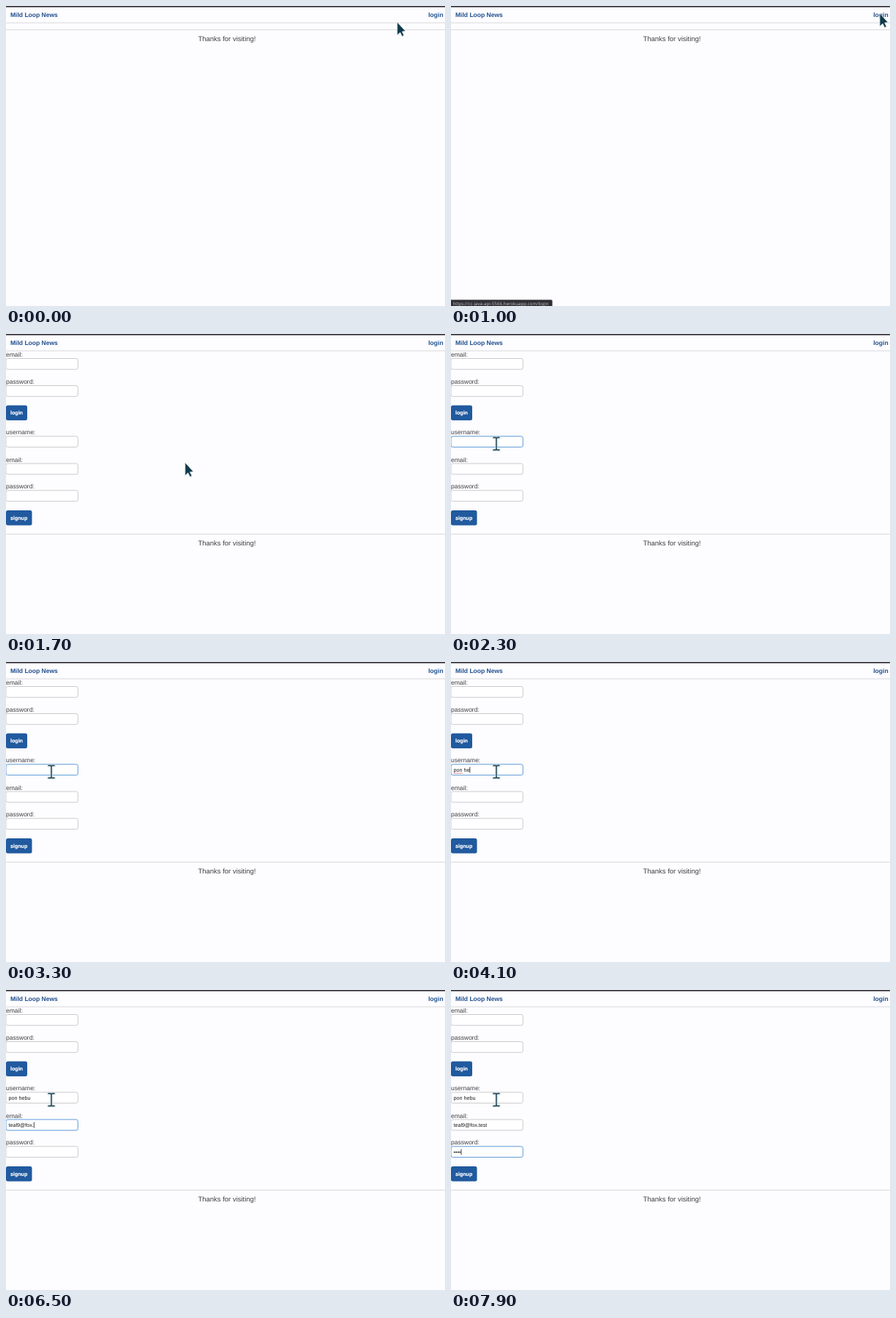
Recreate the animation shown at these times as an HTML page. Size 600 px wide and 410 px high, loop 8000 ms.

```html
<!DOCTYPE html>
<html lang="en">
<head>
<meta charset="utf-8">
<title>Sign-up form</title>
<style>
  html, body { margin: 0; width: 100%; height: 100%; overflow: hidden; background: #fdfcfe; }
  svg { display: block; width: 600px; height: 410px; }
  text { font: 8.53px "Liberation Sans", Arial, sans-serif; fill: #3f3f42; white-space: pre; text-rendering: geometricPrecision; }
  .nav { font-weight: bold; fill: #1f4f8f; }
  .foot { font-size: 9.48px; text-anchor: middle; }
  .value { font-size: 7.15px; fill: #18181a; }
  .button { font-size: 7.1px; font-weight: bold; fill: #fff; stroke: #fff; stroke-width: .2; }
  .status { font: 6.2px "Open Sans", sans-serif; fill: #c4c4c8; }
  .box { fill: #fff; stroke: #cbcbd0; stroke-width: 1; }
  .focus { stroke: #5c9bd8; }
  .rule { stroke: #d9d9dc; stroke-width: 1; }
</style>
</head>
<body>
<svg id="stage" viewBox="0 0 600 410">
  <rect width="600" height="410" fill="#fdfcfe"/>
  <rect width="600" height="1.6" fill="#2d2b31"/>
  <text class="nav" x="6" y="15.2">Mild Loop News</text>
  <text class="nav" x="597.6" y="15.2" text-anchor="end">login</text>
  <path class="rule" d="M0 23H600"/>
  <g id="form"></g>
  <g id="footer">
    <path class="rule" d="M0 32.5H600"/>
    <text class="foot" x="302" y="47.5">Thanks for visiting!</text>
  </g>
  <path id="squiggle" fill="none" stroke="#e0474c" stroke-width=".8"/>
  <rect id="caret" width=".8" height="8" fill="#111"/>
  <g id="status">
    <path d="M0 401.5H137Q138.5 401.5 138.5 403V410H0Z" fill="#302f34"/>
    <text class="status" x="2.5" y="409">https://cc-java-api-5566.herokuapp.com/login</text>
  </g>
  <path id="arrow" d="M0 0V17.8L4 14.2L6.7 19.6L9.3 18.3L6.7 13L11.3 12.4Z"
        fill="#103a4b" stroke="#e4e9ec" stroke-width=".8"/>
  <g id="beam" fill="none">
    <path d="M-5.5-8.5H5.5M0-8.5V8.5M-5.5 8.5H5.5" stroke="#d5dfe5" stroke-width="3.4"/>
    <path d="M-4.5-8.5H-1L0-7.5L1-8.5H4.5M0-7.5V7.5M-4.5 8.5H-1L0 7.5L1 8.5H4.5" stroke="#17404f" stroke-width="1.4"/>
  </g>
</svg>
<script>
const LOOP = 8000, STEP = 100;
const PAGE_AT = 1100, STATUS = [900, 1600], BEAM_AT = 1900;
const $ = id => document.getElementById(id);

function add(parent, name, attrs, content = "") {
  const node = document.createElementNS("http://www.w3.org/2000/svg", name);
  for (const key in attrs) node.setAttribute(key, attrs[key]);
  node.textContent = content;
  return parent.appendChild(node);
}

function addField(label, y) {
  add($("form"), "text", { x: 0, y: y - 2.4 }, label);
  const box = add($("form"), "rect", { class: "box", x: 0, y, width: 98.3, height: 14.8, rx: 2.5 });
  const value = add($("form"), "text", { class: "value", x: 3.6, y: y + 10.3 });
  return { box, value, y };
}

function addButton(label, y, width) {
  add($("form"), "rect", { y, width, height: 20.5, rx: 2.5, fill: "#215a9f" });
  add($("form"), "text", { class: "button", x: 6, y: y + 12.9 }, label);
}

addField("email:", 33.5);
addField("password:", 70.5);
addButton("login", 97.4, 29);
addButton("signup", 241, 35.5);

// Key times are when each character lands.
const inputs = [
  { ...addField("username:", 139.8), text: "pon hebu", from: 2000, to: 4700,
    keys: [3500, 3600, 3700, 3900, 4000, 4100, 4200, 4300] },
  { ...addField("email:", 177), text: "teal9@fox.test", from: 4700, to: 7200,
    keys: [4800, 4900, 5000, 5100, 5300, 5800, 6000, 6100, 6300, 6400, 6600, 6800, 6900, 7000] },
  { ...addField("password:", 213.8), text: "••••", from: 7200, to: LOOP,
    keys: [7400, 7500, 7600, 7700] }
];

const path = [
  [700, 534.7, 22], [950, 586, 10], [1150, 586, 10],
  [1400, 293, 181], [1600, 290, 182], [1950, 62, 150]
];

function pointer(t) {
  const next = path.findIndex(p => p[0] > t);
  if (next === 0) return path[0].slice(1);
  if (next < 0) return path[path.length - 1].slice(1);
  const [a, b] = [path[next - 1], path[next]];
  const u = (t - a[0]) / (b[0] - a[0]);
  const k = u * u * (3 - 2 * u);
  return [a[1] + (b[1] - a[1]) * k, a[2] + (b[2] - a[2]) * k];
}

const show = (node, on) => node.setAttribute("display", on ? "inline" : "none");
const place = (node, x, y) => node.setAttribute("transform", `translate(${x} ${y})`);

function wave(x0, x1, y) {
  let d = `M${x0} ${y}`;
  for (let x = x0 + 1, i = 1; x <= x1; x++, i++) d += `L${x} ${y - i % 2}`;
  return d;
}
$("squiggle").setAttribute("d", wave(3.6, 15.6, 152.6));

function drawInput(input, t) {
  const pressed = input.keys.filter(k => k <= t);
  const focused = t >= input.from && t < input.to;
  input.value.textContent = input.text.slice(0, pressed.length);
  input.box.setAttribute("class", focused ? "box focus" : "box");
  if (!focused) return;
  const idle = t - (pressed.length ? pressed[pressed.length - 1] : input.from);
  show($("caret"), idle % 520 < 260);
  place($("caret"), 3.6 + input.value.getComputedTextLength(), input.y + 3.6);
}

function render(t) {
  const formOpen = t >= PAGE_AT;
  show($("form"), formOpen);
  place($("footer"), 0, formOpen ? 241 : 0);
  show($("status"), t >= STATUS[0] && t < STATUS[1]);
  show($("squiggle"), t >= inputs[0].keys[3] && t < inputs[0].to);
  show($("caret"), false);
  inputs.forEach(input => drawInput(input, t));

  const [x, y] = pointer(t);
  const overField = t >= BEAM_AT;
  show($("arrow"), !overField);
  show($("beam"), overField);
  place($("arrow"), x, y);
  place($("beam"), x, y);
}

const start = performance.now();
function tick() {
  const t = (performance.now() - start) % LOOP;
  render(Math.floor(t / STEP) * STEP);
  requestAnimationFrame(tick);
}
tick();
</script>
</body>
</html>
```
